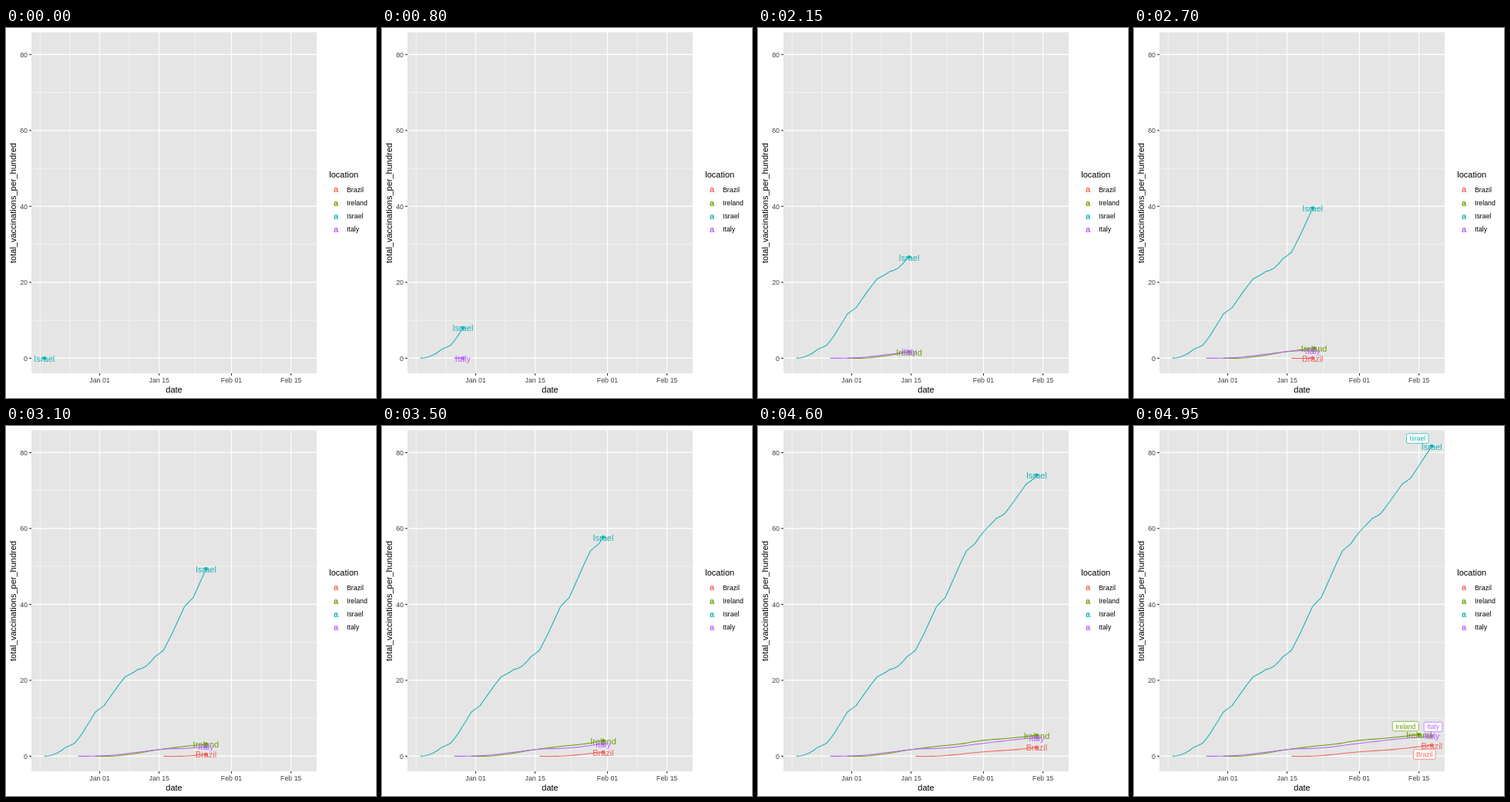
An HTML page that plays this animation: 480x480 px, repeating every 5000 ms.

```html
<!DOCTYPE html>
<html lang="en">
<head>
<meta charset="utf-8">
<title>Vaccinations per hundred</title>
<style>
  html, body { margin: 0; width: 100%; height: 100%; overflow: hidden; background: #fff; }
  svg { display: block; width: 100%; height: 100%; }
  text { font: 11px "Liberation Sans", Arial, sans-serif; }
  .tick { font-size: 8.8px; fill: #404040; }
  .key { font-size: 8.8px; }
  .sign { font-weight: bold; }
  .tag { font-size: 8.54px; }
  .mid { text-anchor: middle; }
  .end { text-anchor: end; }
  .line { fill: none; stroke-width: 1.07; stroke-linejoin: round; }
</style>
</head>
<body>
<svg id="chart" viewBox="0 0 480 480"></svg>
<script>
const LOOP = 5000, STEP = 50, LAST = 99, DAYS = 61;
const panel = { left: 33, right: 403, top: 5.5, bottom: 448 };
const px = day => 49.8 + day * 5.516;
const py = value => 428.4 - value * 4.925;
const stepOf = day => Math.round(day * LAST / DAYS);

const svg = document.getElementById('chart');

function add(parent, name, attrs, text) {
  const el = document.createElementNS('http://www.w3.org/2000/svg', name);
  for (const key in attrs) el.setAttribute(key, attrs[key]);
  if (text) el.textContent = text;
  return parent.appendChild(el);
}

function rule(x1, y1, x2, y2, stroke, width) {
  add(svg, 'line', { x1, y1, x2, y2, stroke, 'stroke-width': width });
}

// Smooth curve through [x, y] knots, flat at the first one.
function curve(knots) {
  const last = knots.length - 1;
  const slope = i => {
    if (i === 0) return 0;
    const a = knots[i - 1], b = knots[Math.min(i + 1, last)];
    return (b[1] - a[1]) / (b[0] - a[0]);
  };
  return x => {
    let i = 0;
    while (i < last - 1 && x >= knots[i + 1][0]) i++;
    const [x0, y0] = knots[i], [x1, y1] = knots[i + 1];
    const w = x1 - x0, u = (x - x0) / w, v = 1 - u;
    return y0 + (y1 - y0) * u * u * (3 - 2 * u) + w * u * v * (slope(i) * v - slope(i + 1) * u);
  };
}

// Five working days carry 84% of a week's progress, the weekend the rest.
function workWeek(day) {
  const r = day % 7;
  return day - r + 7 * (r <= 5 ? r * .168 : .84 + (r - 5) * .08);
}

function daily(first, last, value, gaps = []) {
  const rows = [];
  for (let day = first; day <= last; day++) {
    if (!gaps.includes(day)) rows.push({ day, value: value(day), step: stepOf(day) });
  }
  return rows;
}

const brazil = curve([[28, 0], [33, .04], [37, .36], [42, .96], [47, 1.4], [52, 1.78], [61, 2.9]]);
const ireland = curve([[12, 0], [17, .1], [22, .8], [26, 1.6], [32, 2.47], [39, 3.3], [43, 4.05], [52, 4.95], [58, 5.68]]);
const italy = curve([[8, 0], [15, .2], [22, 1.06], [27, 1.75], [36, 2.28], [43, 3.25], [52, 4.42], [61, 5.38]]);
const israel = curve([[0, 0], [7, 3.31], [14, 13.26], [21, 22.1], [workWeek(24), 23.8], [28, 27.9],
  [35, 41.8], [42, 56], [49, 63.9], [56, 73.2], [63, 83.3]]);

// tag: x, y, width of the closing label
const series = [
  { name: 'Brazil', color: '#f0665e', tag: [362.5, 419.8, 28.5], rows: daily(28, DAYS, brazil) },
  { name: 'Ireland', color: '#6b9f00', tag: [335.3, 383.3, 34], rows: daily(12, 58, ireland, [13, 14, 20, 33, 41]) },
  { name: 'Israel', color: '#1bb2b7', tag: [353.5, 9.9, 28.5], rows: daily(0, DAYS, day => israel(workWeek(day))) },
  { name: 'Italy', color: '#b963ff', tag: [376.2, 384.2, 23.8], rows: daily(8, DAYS, italy) }
];

function drawAxes() {
  const { left, right, top, bottom } = panel;
  const dates = [[13, 'Jan 01'], [27, 'Jan 15'], [44, 'Feb 01'], [58, 'Feb 15']];
  add(svg, 'rect', { x: left, y: top, width: right - left, height: bottom - top, fill: '#e5e5e5' });
  for (const v of [10, 30, 50, 70]) rule(left, py(v), right, py(v), '#fff', .53);
  for (const d of [-1, 6, 20, 35.5, 51]) rule(px(d), top, px(d), bottom, '#fff', .53);
  for (const v of [0, 20, 40, 60, 80]) {
    rule(left, py(v), right, py(v), '#fff', 1.07);
    rule(left - 2.75, py(v), left, py(v), '#262626', 1.07);
    add(svg, 'text', { x: 28, y: py(v) + 3.2, class: 'tick end' }, String(v));
  }
  for (const [d, label] of dates) {
    rule(px(d), top, px(d), bottom, '#fff', 1.07);
    rule(px(d), bottom, px(d), bottom + 2.75, '#262626', 1.07);
    add(svg, 'text', { x: px(d), y: 460, class: 'tick mid' }, label);
  }
  add(svg, 'text', { x: 218, y: 473, class: 'mid' }, 'date');
  add(svg, 'text', { transform: 'translate(13 227) rotate(-90)', class: 'mid' },
    'total_vaccinations_per_hundred');
}

function drawLegend() {
  add(svg, 'text', { x: 419.3, y: 194 }, 'location');
  series.forEach((s, i) => {
    const y = 210 + i * 17.1;
    add(svg, 'text', { x: 428, y: y + 3.4, fill: s.color, class: 'sign mid' }, 'a');
    add(svg, 'text', { x: 442, y: y + 3, class: 'key' }, s.name);
  });
}

function makeTag(parent, { name, color, tag: [x, y, width] }) {
  const g = add(parent, 'g', {});
  add(g, 'rect', { x, y, width, height: 12.4, rx: 2, fill: '#fff', stroke: color, 'stroke-width': .7 });
  add(g, 'text', { x: x + width / 2, y: y + 9.2, fill: color, class: 'tag mid' }, name);
  return g;
}

function build() {
  drawAxes();
  drawLegend();
  const [lines, dots, names, tags] = [0, 1, 2, 3].map(() => add(svg, 'g', {}));
  for (const s of series) {
    s.line = add(lines, 'path', { class: 'line', stroke: s.color });
    s.dot = add(dots, 'circle', { r: 2.45, fill: s.color });
    s.text = add(names, 'text', { class: 'mid', fill: s.color }, s.name);
    s.label = makeTag(tags, s);
  }
}

// Rows revealed so far, ending in the interpolated head.
function reveal(rows, step) {
  const past = rows.filter(r => r.step <= step);
  const prev = past[past.length - 1], next = rows[past.length];
  if (prev && next && prev.step < step) {
    const t = (step - prev.step) / (next.step - prev.step);
    past.push({
      day: prev.day + (next.day - prev.day) * t,
      value: prev.value + (next.value - prev.value) * t
    });
  }
  return past;
}

function show(el, on) {
  el.setAttribute('visibility', on ? 'visible' : 'hidden');
}

function render(step) {
  for (const s of series) {
    const pts = reveal(s.rows, step);
    const on = pts.length > 0;
    [s.line, s.dot, s.text].forEach(el => show(el, on));
    show(s.label, step >= s.rows[s.rows.length - 1].step);
    if (!on) continue;
    const head = pts[pts.length - 1], x = px(head.day), y = py(head.value);
    s.line.setAttribute('d', 'M' + pts.map(p => px(p.day).toFixed(2) + ' ' + py(p.value).toFixed(2)).join('L'));
    s.dot.setAttribute('cx', x);
    s.dot.setAttribute('cy', y);
    s.text.setAttribute('x', x);
    s.text.setAttribute('y', y + 4.4);
  }
}

const start = performance.now();
let shown = -1;

function tick() {
  const step = Math.floor((performance.now() - start) % LOOP / STEP);
  if (step !== shown) render(shown = step);
  requestAnimationFrame(tick);
}

build();
tick();
</script>
</body>
</html>
```
